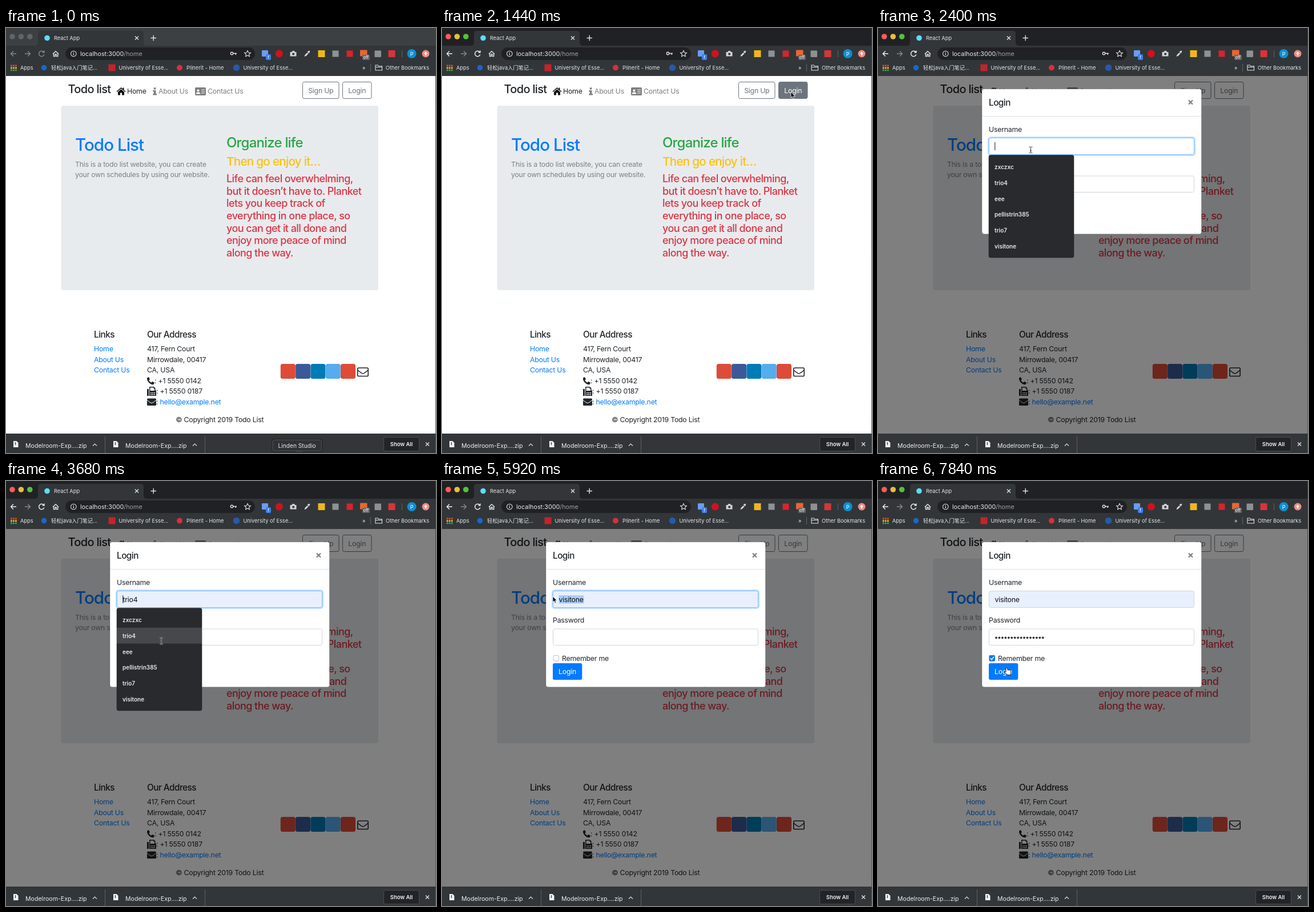
Write an HTML page that moves like this. It is 753x744 px and loops after 8 s.

```html
<!DOCTYPE html>
<html lang="en">
<head>
<meta charset="utf-8">
<title>Todo list login</title>
<style>
html, body { margin: 0; width: 100%; height: 100%; overflow: hidden; background: #fff; }
svg { display: block; width: 753px; height: 744px; font-family: Inter, "Noto Sans CJK SC", "Noto Sans CJK", sans-serif; font-optical-sizing: none; }
text { dominant-baseline: central; white-space: pre; }
.body text, .head text, text.head { transform: translateY(-.035em); }
.body { font-size: 12.35px; letter-spacing: -.02em; fill: #212529; }
.head { font-weight: 500; letter-spacing: -.034em; fill: #212529; }
.h5 { font-size: 15.3px; }
.link { fill: #007bff; }
.dim { fill: #7f7f7f; }
.bar { font-size: 9.24px; fill: #e4e6e9; }
.file { font-size: 10.6px; fill: #eceef0; }
.list { font-size: 10px; font-weight: 600; fill: #e8eaed; }
.line { fill: none; stroke: #dfe1e5; stroke-width: 1.4; }
.field { fill: #fff; stroke: #ced4da; }
.field.filled { fill: #e8f0fe; }
.field.focus { stroke: #80bdff; }
.btn { fill: #fff; stroke: #6c757d; }
.btn.hover { fill: #6c757d; }
.mid { text-anchor: middle; }
</style>
</head>
<body>
<svg viewBox="0 0 753 744">
  <defs>
    <linearGradient id="edge" x1="0" y1="0" x2="0" y2="1">
      <stop offset="0" stop-color="#3b4154"/><stop offset="1" stop-color="#8a4450"/>
    </linearGradient>
  </defs>

  <!-- page -->
  <rect y="84" width="753" height="626" fill="#fff"/>
  <text class="head" x="108.5" y="108" style="font-size:20px">Todo list</text>
  <path d="M193.5 111l8-7 3 2.6v-2h2v3.8l3 2.6-1 1.1-7-6.1-7 6.1zM196 112l5.5-4.8 5.5 4.8v5.5h-4v-4h-3v4h-4z" fill="#111"/>
  <path d="M258.800 104.300h3.600v3.200h-3.600zM257.300 109h5.100v6h1.600v2.500h-6.700V115h1.500v-3.500h-1.500z" fill="#7f7f7f"/>
  <rect x="331" y="104" width="19" height="14" rx="1.800" fill="#7f7f7f"/>
  <path d="M333 115c0-3 7-3 7 0zM342 108h6m-6 3h6m-6 3h6" fill="#fff" stroke="#fff" stroke-width=".9"/>
  <circle cx="336.500" cy="109.500" r="2" fill="#fff"/>
  <g class="body">
    <text x="212" y="111">Home</text>
    <text class="dim" x="267" y="111">About Us</text>
    <text class="dim" x="353" y="111">Contact Us</text>
    <rect class="btn" x="519.500" y="94.500" width="63.500" height="29" rx="3"/>
    <text class="mid" x="551.300" y="109.500" fill="#6c757d">Sign Up</text>
    <rect class="btn" id="loginBtn" x="589.500" y="94.500" width="50.500" height="29" rx="3"/>
    <text class="mid" id="loginText" x="614.800" y="109.500">Login</text>
  </g>

  <rect x="96.500" y="136" width="555.500" height="323" rx="4" fill="#e8ebee"/>
  <text class="head link" x="121" y="205" style="font-size:29.600px;font-weight:450">Todo List</text>
  <g class="body">
    <text x="121" y="238.500" style="fill:#7d8287">This is a todo list website, you can create</text>
    <text x="121" y="257" style="fill:#7d8287">your own schedules by using our website.</text>
  </g>
  <text class="head" x="386" y="201" style="font-size:24px;fill:#28a745">Organize life</text>
  <text class="head" x="386" y="234.500" style="font-size:20.600px;fill:#ffc107">Then go enjoy it…</text>
  <g id="pitch" class="head" style="font-size:18px;fill:#dc3545;letter-spacing:-.031em"></g>

  <text class="head h5" x="154" y="537">Links</text>
  <text class="head h5" x="247" y="537">Our Address</text>
  <g class="body">
    <g class="link">
      <text x="154" y="562">Home</text>
      <text x="154" y="580.500">About Us</text>
      <text x="154" y="599">Contact Us</text>
    </g>
    <text x="247" y="562">417, Fern Court</text>
    <text x="247" y="580.500">Mirrowdale, 00417</text>
    <text x="247" y="599">CA, USA</text>
    <text x="260" y="617.500">: +1 5550 0142</text>
    <text x="263" y="636">: +1 5550 0187</text>
    <text x="263" y="654.500">: <tspan class="link">hello@example.net</tspan></text>
    <text class="mid" x="374.300" y="685.500">© Copyright 2019 Todo List</text>
  </g>
  <g fill="#212529">
    <path d="M247 612.500l3-1.500 2 4-1.800 1.500q1.500 3.200 4.300 4.300l1.700-2 3.800 2-1.500 3.200q-2 .6-5-.8-5-3-6.500-8z"/>
    <path d="M247 632h3v12h-3zM251 628h8l2.500 2.500v4H263V644h-12z"/>
    <path d="M252.500 629.500h6v2h1.500v3.500h-7.500zM253 638h2v1.500h-2zm3 0h2v1.500h-2zm3 0h2v1.500h-2zm-6 3h2v1.500h-2zm3 0h2v1.500h-2zm3 0h2v1.500h-2z" fill="#fff"/>
    <rect x="247" y="648.500" width="16" height="12.500" rx="1.500"/>
    <path d="M247 651.500q6 5 8 5t8-5" fill="none" stroke="#fff"/>
  </g>
  <g id="social"></g>
  <g fill="none" stroke="#212529" stroke-width="1.600">
    <rect x="615.800" y="595" width="18.400" height="14.500" rx="1.800"/>
    <path d="M616 599q7 6 9 6t9-6"/>
  </g>

  <rect id="shade" y="84" width="753" height="626" fill="#000" opacity=".5"/>

  <!-- dialog -->
  <g id="dialog">
    <rect x="182" y="106.700" width="384.500" height="254" rx="4" fill="#fff" stroke="#000" stroke-opacity=".2"/>
    <path d="M182.500 154.500h383.500" stroke="#dee2e6"/>
    <text class="head h5" x="194" y="131">Login</text>
    <path d="M544 126.500l7 7m0-7l-7 7" stroke="#7f7f7f" stroke-width="2.200"/>
    <rect id="ring" x="193.200" y="191.200" width="361.600" height="31.600" rx="4.500" fill="none" stroke="#bfdeff" stroke-width="2.600"/>
    <rect class="field" id="userField" x="194.500" y="192.500" width="359" height="29" rx="3"/>
    <rect class="field" x="194.500" y="259" width="359" height="28.500" rx="3"/>
    <g class="body">
      <text x="194" y="177.500">Username</text>
      <text x="194" y="244">Password</text>
      <rect id="mark" x="204.500" y="200" width="44" height="14.500" fill="#accef7"/>
      <text id="user" x="204.500" y="207.500" style="fill:#111"></text>
      <text x="210" y="310.500">Remember me</text>
      <rect x="194" y="319" width="51.300" height="29" rx="3" fill="#007bff"/>
      <text class="mid" x="219.600" y="334" style="fill:#fff">Login</text>
    </g>
    <g id="dots" fill="#333"></g>
    <rect x="195" y="305.500" width="9.500" height="9.500" rx="1.500" fill="#fff" stroke="#bfc2c5"/>
    <g id="tick">
      <rect x="194.500" y="305" width="10.500" height="10.500" rx="1.800" fill="#0b78f0"/>
      <path d="M196.800 310.300l2.200 2.300 4-5" fill="none" stroke="#fff" stroke-width="1.500"/>
    </g>
    <path id="caret" d="M204.800 200v14" stroke="#111"/>
  </g>
  <g id="menu">
    <rect x="194" y="222.500" width="149" height="179.500" rx="3" fill="#292a2d" stroke="#1b1c1e" stroke-opacity=".5"/>
    <rect id="row" x="194" width="149" height="27.800" fill="#47484b"/>
    <g id="names" class="list"></g>
  </g>

  <!-- browser frame -->
  <rect id="strip" width="753" height="32"/>
  <path d="M50 31q6 0 6-6V10q0-5 5-5h175q5 0 5 5v15q0 6 6 6h506v53H0V31z" fill="#323639"/>
  <g id="lights"></g>
  <circle cx="72" cy="17.500" r="4.800" fill="#61dafb"/>
  <text class="bar" x="84" y="17.500">React App</text>
  <path class="line" d="M226 14.500l6 6m0-6l-6 6M253.500 17.500h9.500m-4.750-4.750v9.500"/>
  <path class="line" id="back" d="M18 45H8.500m4.500-4.500L8.500 45l4.500 4.500"/>
  <path class="line" d="M33 45h9.500m-4.500-4.500l4.500 4.500-4.500 4.500" style="stroke:#85898d"/>
  <path class="line" id="reload" d="M66 42a4.700 4.700 0 1 0 .8 4.500M67 39.500v3.300h-3.300"/>
  <path class="line" d="M82 45.500l5-4.800 5 4.800M83.500 44.500v5h2.500v-3.500h2.200v3.500h2.500v-5"/>
  <rect x="104" y="34" width="332" height="22" rx="11" fill="#202124"/>
  <circle class="line" cx="118.300" cy="45" r="4.800" style="stroke-width:1.100"/>
  <path class="line" d="M118.300 44.500v3m0-5.300v1.200"/>
  <text x="130" y="45" font-size="10.800" fill="#e8eaed">localhost:3000<tspan fill="#9aa0a6">/home</tspan></text>
  <g id="key" class="line"><circle cx="395.500" cy="44.500" r="2.200"/><path d="M397.700 44.500h6.300m-1.800 0v2.500"/></g>
  <path class="line" d="M423 39.500l1.600 3.500 3.800.4-2.800 2.600.8 3.800-3.400-1.900-3.400 1.900.8-3.800-2.800-2.600 3.800-.4z" style="stroke-width:1.100"/>

  <rect x="448" y="39" width="11" height="11" rx="1" fill="#6c9cf0"/>
  <rect x="455" y="46" width="9" height="10" rx="2" fill="#3d7ff0"/>
  <text class="mid" x="459.500" y="51" font-size="7" font-weight="700" fill="#fff">!</text>
  <circle cx="478.300" cy="45" r="6.500" fill="#d0121f"/>
  <path d="M497.500 42h3l1-2h3.500l1 2h2.500v7.500h-11z" fill="#cfd2d5"/>
  <circle cx="503.200" cy="45.500" r="2" fill="#323639"/>
  <path d="M522.500 50l1-3 4-4 2 2-4 4zM527.500 41.500l3.500-2 1.500 1.500-2 3.500z" fill="#d5d8db"/>
  <rect x="546.500" y="39" width="12" height="12" fill="#efb71d"/>
  <rect x="571.500" y="39.500" width="11" height="11" fill="#8d9296"/>
  <rect x="596.500" y="39.500" width="11" height="11" fill="#d8242c"/>
  <rect x="620" y="38.500" width="12.500" height="11" rx="1" fill="#ec6431"/>
  <rect x="624" y="47" width="13" height="9" rx="1.500" fill="#5f6368"/>
  <text class="mid" x="630.500" y="51.500" font-size="7.500" fill="#fff">off</text>
  <rect x="645.500" y="39.500" width="11.500" height="11.500" rx="1" fill="#8e9194"/>
  <rect x="669.500" y="39" width="12" height="12" rx="1" fill="#d8343b"/>
  <path d="M693.500 39v12M638.500 63v13" stroke="#606468"/>
  <circle cx="710.500" cy="45" r="8" fill="#0c8fd3"/>
  <text class="mid" x="710.500" y="45" font-size="9" fill="#fff">P</text>
  <circle cx="735" cy="45" r="6.500" fill="#f08a83"/>
  <path d="M735 41.500l3.200 3.500h-2v3h-2.400v-3h-2z" fill="#fff"/>

  <g id="apps"></g>
  <circle cx="66.500" cy="69.500" r="4.800" fill="#1b66c9"/>
  <rect x="179.500" y="63.500" width="12" height="12" fill="#c4232d"/>
  <circle cx="304" cy="69.500" r="5" fill="#d5303d"/>
  <circle cx="403.500" cy="69.500" r="5.800" fill="#2759a8"/>
  <path class="line" d="M647 65h4l1.500 1.700h6V74H647zm0 3.500h11.500" style="stroke-width:1.100"/>
  <g class="bar">
    <text x="25" y="69.500">Apps</text>
    <text x="79" y="69.500">轻松java入门笔记...</text>
    <text x="197.500" y="69.500">University of Esse...</text>
    <text x="316" y="69.500">Plinerit - Home</text>
    <text x="415.500" y="69.500">University of Esse...</text>
    <text x="624" y="69">»</text>
    <text x="665" y="69.500">Other Bookmarks</text>
  </g>

  <!-- download shelf -->
  <rect y="710" width="753" height="34" fill="#323639"/>
  <path d="M173.500 715v29M348.500 715v29" stroke="#5c6064"/>
  <g id="files" class="file"></g>
  <rect x="661.500" y="716.500" width="62" height="24" rx="2.500" fill="#222427" stroke="#494d51"/>
  <text class="mid" x="692.500" y="728.500" font-size="9.400" font-weight="600" fill="#f1f3f4">Show All</text>
  <path class="line" d="M735 725.500l6 6m0-6l-6 6"/>
  <rect x="752" width="1" height="744" fill="url(#edge)"/>
  <g id="tip">
    <rect x="466" y="720" width="87.500" height="21.500" rx="3.500" fill="#303236" stroke="#131416"/>
    <rect x="467" y="721" width="85.500" height="19.500" rx="2.500" fill="none" stroke="#5a5c5f"/>
    <path d="M506 741l7 4 7-4z" fill="#303236"/>
    <text class="mid" x="509.500" y="731" font-size="10.200" fill="#e8eaed">Linden Studio</text>
  </g>

  <!-- pointers -->
  <path id="arrow" d="M0 0v10l2.300-2 1.700 3.800 1.800-.8-1.700-3.700h3.100z" fill="#000" stroke="#fff" stroke-width=".8"/>
  <g id="beam" fill="none">
    <path d="M-3-5.500q3 0 3 1.500 0-1.500 3-1.500M0-4.500v9M-3 5.500q3 0 3-1.500 0 1.500 3 1.500M-1.500 1.500h3" stroke="#fff" stroke-opacity=".7" stroke-width="2"/>
    <path d="M-3-5.500q3 0 3 1.500 0-1.500 3-1.500M0-4.500v9M-3 5.500q3 0 3-1.500 0 1.500 3 1.500M-1.500 1.500h3" stroke="#333"/>
  </g>
  <path id="hand" d="M-1 0q1.200-1 2 .3l1.300 4 1-.6 1.300.4 1.200-.2 1.300.8q1 2.800.5 6l-.5 1.800h-5L-2.500 9l-1.700-2.300q.7-1.300 2.300.1l.9.7z" fill="#fff" stroke="#111" stroke-width=".9"/>
</svg>
<script>
const STEP = 160, LOOP = 8000;
const $ = id => document.getElementById(id);
const fill = (id, items, draw) => $(id).innerHTML = items.map(draw).join("");
const range = n => [...Array(n).keys()];
const names = ["zxczxc", "trio4", "eee", "pellistrin385", "trio7", "visitone"];
const ROW = 27.8, ROWS_TOP = 229;

fill("pitch", ["Life can feel overwhelming,", "but it doesn’t have to. Planket", "lets you keep track of",
  "everything in one place, so", "you can get it all done and", "enjoy more peace of mind", "along the way."],
  (s, i) => `<text x="386" y="${264.3 + i * 21.6}">${s}</text>`);
fill("social", ["#dd4b39", "#3b5998", "#007bb5", "#55acee", "#dd4b39"],
  (c, i) => `<rect x="${480.8 + i * 26.3}" y="588" width="26" height="26" rx="3.5" fill="${c}"/>`);
fill("names", names, (s, i) => `<text x="204" y="${243 + i * ROW}">${s}</text>`);
fill("dots", range(16), i => `<circle cx="${207 + i * 5.45}" cy="274.300" r="1.900"/>`);
fill("lights", range(3), i => `<circle cx="${11 + i * 15.4}" cy="15" r="4.800"/>`);
fill("apps", range(9), i => `<rect x="${8 + i % 3 * 4}" y="${64.5 + (i / 3 | 0) * 4}" width="2.800" height="2.800"
  fill="${["#ea4335", "#fbbc04", "#34a853"][(i / 3 | 0)]}"/>`);
fill("files", [0, 175], x => `<path d="M${x + 13} 723h5.500l3 3v8h-8.500z" fill="#f1f3f4"/>
  <path d="M${x + 16.5} 725v5" stroke="#44474a" stroke-width="1.500"/>
  <text x="${x + 34}" y="731">Modelroom-Exp....zip</text>
  <path class="line" d="M${x + 152} 731.500l3.500-3.500 3.500 3.500" style="stroke-width:1.100"/>`);

// pointer path: step, x, y
const path = [[2, 512, 742], [8, 611, 112], [9, 611, 112], [10, 503, 136], [13, 300, 205], [15, 267.5, 213.5],
  [21, 267.5, 213.5], [23, 272, 280], [28, 273, 392], [30, 273, 392], [32, 262, 207], [34, 252, 207],
  [36, 196, 204], [37, 194, 202], [39, 150, 206], [40, 150, 206], [42, 240, 250], [44, 199, 308],
  [45, 199, 308], [49, 225, 327]];

function pointerAt(n) {
  const i = path.findIndex(p => p[0] >= n);
  if (i <= 0) return path[0].slice(1);
  const [a, b] = [path[i - 1], path[i]], k = (n - a[0]) / (b[0] - a[0]);
  return [a[1] + (b[1] - a[1]) * k, a[2] + (b[2] - a[2]) * k];
}
const show = (id, on) => $(id).style.display = on ? "" : "none";
const inside = (x, y, l, t, r, b) => x > l && x < r && y > t && y < b;

function draw(n) {
  const [x, y] = pointerAt(n), time = n * STEP;
  const active = n >= 3, menu = n >= 14 && n < 29, open = n >= 10;

  $("strip").setAttribute("fill", active ? "#202124" : "#3c4043");
  [...$("lights").children].forEach((c, i) =>
    c.setAttribute("fill", active && !(n === 10 && i === 2) ? ["#fc5b57", "#e5bf3c", "#57c038"][i] : "#606468"));
  for (const id of ["back", "reload"]) $(id).style.stroke = active ? "#f1f3f4" : "#85898d";
  show("tip", n < 2);
  show("key", n < 29 || n >= 40);

  const over = !open && n > 2 && inside(x, y, 589, 94, 641, 124);
  $("loginBtn").classList.toggle("hover", over);
  $("loginText").style.fill = over ? "#fff" : "#6c757d";

  // dialog fades in while dropping into place
  const since = Math.max(0, time - 1540);
  const left = Math.pow(1 - Math.min(1, since / 300), 1.85);
  show("shade", open);
  show("dialog", open);
  $("dialog").setAttribute("opacity", Math.min(1, since / 150));
  $("dialog").setAttribute("transform", `translate(0 ${-38.6 * left})`);

  const row = menu && n > 21 ? Math.max(0, Math.min(5, Math.floor((y - ROWS_TOP) / ROW))) : -1;
  show("menu", menu);
  show("row", row >= 0);
  $("row").setAttribute("y", ROWS_TOP + row * ROW);
  $("user").textContent = row >= 0 ? names[row] : n >= 29 ? names[5] : "";

  const focus = n >= 13 && n < 43;
  show("ring", focus);
  $("userField").classList.toggle("focus", focus);
  $("userField").classList.toggle("filled", n >= 22);
  show("caret", n >= 13 && n < 29 && (n < 17 || n > 19));

  const from = n < 37 ? Math.min(248.5, Math.max(204.5, x)) : 204.5;
  show("mark", n >= 34 && n < 40);
  $("mark").setAttribute("x", from);
  $("mark").setAttribute("width", 248.5 - from);
  show("dots", n >= 40);
  show("tick", n >= 45);

  const hand = open && inside(x, y, 194, 319, 245, 348);
  const beam = n > 10 && !hand && (menu && y > 190 || inside(x, y, 196.5, 192, 554, 222) || inside(x, y, 195, 259, 554, 288));
  const kind = hand ? "hand" : beam ? "beam" : "arrow";
  for (const id of ["arrow", "beam", "hand"]) show(id, n >= 2 && id === kind);
  $(kind).setAttribute("transform", `translate(${x} ${y})`);
}

let last = -1;
function tick() {
  const n = Math.floor(performance.now() % LOOP / STEP);
  if (n !== last) draw(last = n);
  requestAnimationFrame(tick);
}
tick();
</script>
</body>
</html>
```
